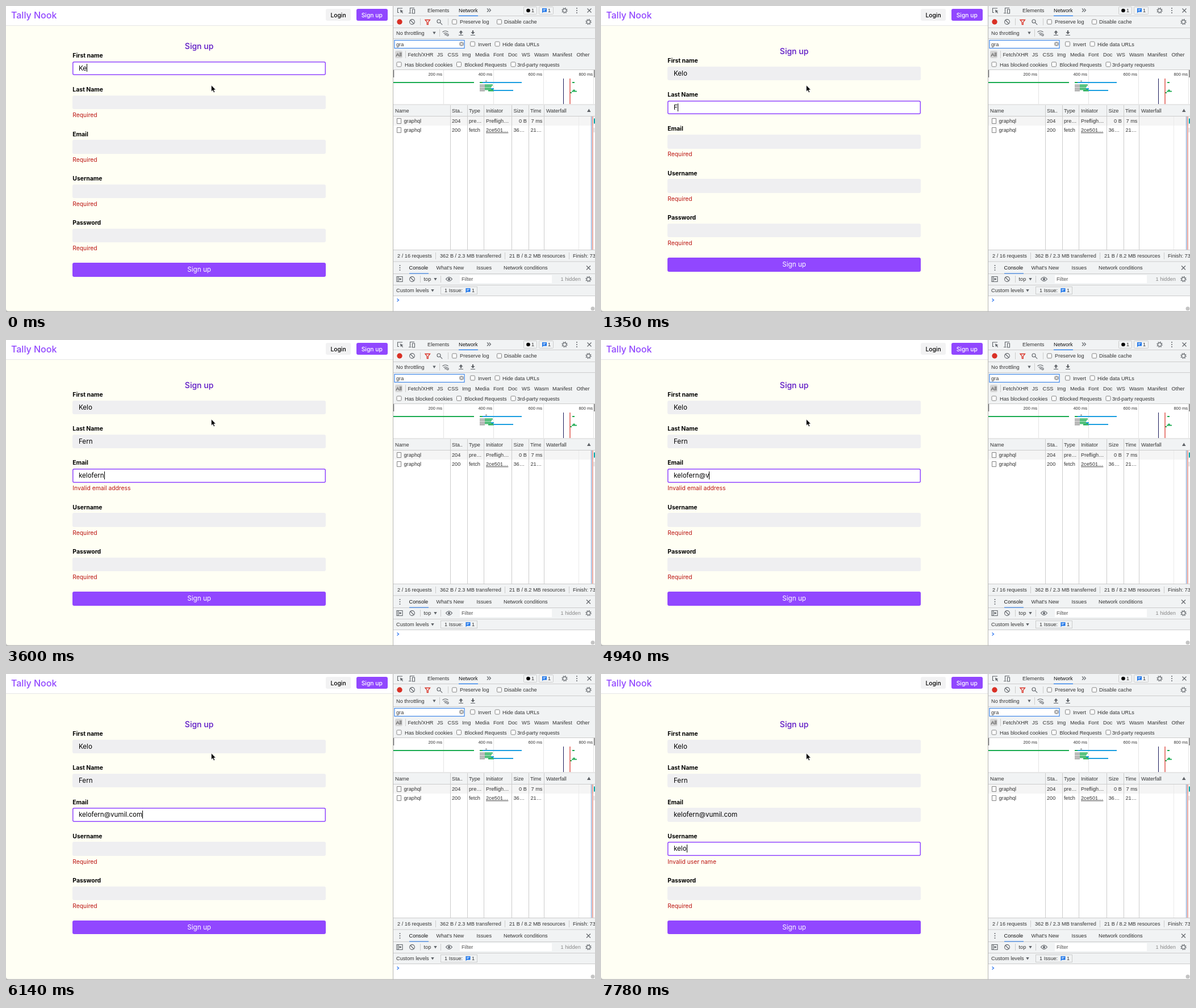
These frames come from a looping animation (1037 px wide and 540 px high, 8 s). An HTML page:

```html
<!DOCTYPE html>
<html lang="en">
<head>
<meta charset="utf-8">
<title>Sign up form</title>
<style>
html, body { margin: 0; width: 100%; height: 100%; overflow: hidden; background: #fff; }
#stage { position: relative; width: 1037px; height: 540px; overflow: hidden; font-family: Inter, sans-serif; color: #000; }
#page { position: absolute; left: 0; top: 0; width: 681px; height: 540px; background: #fffff4; }
#bar { position: absolute; left: 0; top: 0; width: 681px; height: 34px; background: #fff; border-bottom: 1px solid #e6e6e6; }
#bar div { position: absolute; white-space: nowrap; }
#bar .brand { left: 9px; top: 6px; line-height: 20px; font-size: 16px; font-weight: 500; color: #9147ff; }
#bar .btn { top: 5px; height: 21px; line-height: 22px; border-radius: 3px; font-size: 10.3px; font-weight: 500; text-align: center; }
#form { position: absolute; left: 117.3px; width: 445.6px; white-space: nowrap; }
#form h1 { position: relative; top: .6px; margin: 0; font-size: 14px; line-height: 16px; font-weight: 500; text-align: center; color: #5c16c5; }
.field { position: relative; height: 60.2px; }
.field.bad { height: 78.4px; }
.field b { font-size: 10.4px; line-height: 18px; position: absolute; top: 1px; }
.input { position: absolute; top: 19.6px; left: 0; box-sizing: border-box; width: 100%; height: 24.5px; padding-left: 10.7px; line-height: 24.5px; border-radius: 3px; font-size: 11.6px; background: #efeff1; }
.input.half { background: #f7f7f8; box-shadow: inset 0 0 0 1.5px #c09bfc; }
.input.on { background: #fff; box-shadow: inset 0 0 0 1.5px #9147ff; }
.input i { display: none; width: 1px; height: 14px; background: #000; vertical-align: middle; margin-top: -2px; }
.input.caret i { display: inline-block; }
.field p { position: absolute; top: 45px; margin: 0; line-height: 18px; font-size: 10.3px; color: #bb1411; }
#send { margin-top: 1.4px; height: 24.5px; line-height: 24.5px; border-radius: 3px; background: #9147ff; color: #fff; font-size: 11.7px; text-align: center; }
svg { position: absolute; left: 0; top: 0; }
svg text { font: 9.2px "Liberation Sans", Arial, sans-serif; fill: #333; }
.line { stroke: #ccc; fill: none; }
.icon { stroke: #5f6368; fill: none; stroke-width: 1.1; }
.solid { fill: #5f6368; }
.box { fill: #fff; stroke: #767676; stroke-width: .9; }
</style>
</head>
<body>
<div id="stage">
  <div id="page">
    <div id="bar">
      <div class="brand">Tally Nook</div>
      <div class="btn" style="left:563px;width:44px;background:#f2f2f3">Login</div>
      <div class="btn" style="left:617px;width:54.6px;background:#9147ff;color:#fff">Sign up</div>
    </div>
    <div id="form"><h1>Sign up</h1><div id="fields"></div><div id="send">Sign up</div></div>
  </div>
  <svg width="1037" height="540" viewBox="0 0 1037 540">
    <defs>
      <g id="check"><rect class="box" x=".5" y=".5" width="8" height="8" rx="1.5"/></g>
      <g id="ban" class="icon"><circle r="4.4"/><path d="M-3-3 3 3"/></g>
      <g id="gear"><circle class="icon" r="3.1" stroke-width="2"/><circle class="icon" r="4.7" stroke-width="1.6" stroke-dasharray="1.8 1.89"/></g>
      <path id="down" class="solid" d="M-2.7-2h5.4L0 2.5z"/>
      <path id="close" class="icon" d="M-3.5-3.5l7 7m0-7l-7 7"/>
      <g id="dots" class="solid"><circle cy="-4" r="1"/><circle r="1"/><circle cy="4" r="1"/></g>
      <g id="note"><path d="M-4-4h8v6.5h-6L-4 4.5z" fill="#1a73e8"/><path d="M-2.4-2h4.8M-2.4 0h3.2" stroke="#fff"/></g>
      <path id="file" class="box" d="M.5.5h7v9h-7z"/>
    </defs>

    <!-- panel surfaces -->
    <path d="M681 0h356v540H681z" fill="#fff"/>
    <path d="M681 0h356v112H681zM681 175h356v19H681zM681 431h356v80H681z" fill="#f1f3f4"/>
    <path d="M682 195h355v16H682z" fill="#f5f5f5"/>
    <path class="line" d="M682 17.5h355M682 38.5h355M682 57.5h355M682 112.5h355M682 174h355M682 194.5h355M682 430.5h355M682 451h355M682 472.5h355M682 492.5h355M682 511.5h355"/>
    <path class="line" d="M782.5 175v255M812.5 175v255M841.5 175v255M890.5 175v255M920.5 175v255M947.5 175v255"/>
    <path class="line" d="M729.5 22v12M778.5 22v12M763.5 41v13M703.5 79v13M729.5 476v12M765.5 476v12M756.5 435v12M878.5 435v12M991.5 435v12"/>
    <path d="M681.5 0v540" stroke="#b5b5b5"/>

    <!-- tabs -->
    <g class="icon"><path d="M698 4h-8.500v7.500h2.500"/><path class="solid" d="M694 6.500l5.500 2.500-2.400.8 2 2.400-1 .8-2-2.400-1.200 2z" stroke="none"/><path d="M711.500 11.500V3.500h7.500M709 12.500h4.500M715.500 6h4v7h-4z"/></g>
    <text y="11.200"><tspan x="742">Elements</tspan><tspan x="797" fill="#111">Network</tspan></text>
    <path d="M797 17.300h34M710 472h34" stroke="#1a73e8" stroke-width="1.200"/>
    <path class="icon" d="M847 4.500l3 3-3 3m3.500-6l3 3-3 3"/>
    <g class="line"><rect x="911.500" y="1.500" width="23" height="13" rx="1"/><rect x="938.500" y="1.500" width="25" height="13" rx="1"/></g>
    <circle cx="919.500" cy="8" r="3.300"/><use href="#note" x="948" y="8"/>
    <text y="11.200"><tspan x="925">1</tspan><tspan x="954">1</tspan></text>
    <use href="#gear" x="983.500" y="8"/><use href="#dots" x="1005" y="8"/><use href="#close" x="1027" y="8"/>

    <!-- network toolbar -->
    <circle cx="693" cy="28" r="4.700" fill="#d93025"/><use href="#ban" x="715" y="28"/>
    <path d="M738 24.500h8.500l-3.200 4.200v4h-2v-4z" fill="none" stroke="#d93025" stroke-width="1.300"/>
    <g class="icon"><circle cx="762" cy="27" r="3"/><path d="M764.200 29.200l4 4"/></g>
    <use href="#check" x="785" y="23.500"/><use href="#check" x="864" y="23.500"/>
    <text y="31.200"><tspan x="799">Preserve log</tspan><tspan x="877">Disable cache</tspan></text>
    <use href="#gear" x="1025.500" y="28"/>
    <text x="687" y="50.800">No throttling</text><use href="#down" x="754" y="47.500"/>
    <g class="icon"><path d="M768.500 46q5-4 10 0M770.500 48.500q3-2 6 0"/><circle cx="773.500" cy="50.500" r=".6"/><circle cx="777.500" cy="51" r="1.700"/><path d="M797 51.500h8M818 51.500h8"/></g>
    <path class="solid" d="M800 50v-3h-2.500l3.500-4 3.500 4H802v3zM821 43v3h-2.500l3.500 4 3.500-4H823v-3z"/>
    <rect x="684" y="60.500" width="123" height="14" fill="#fff" stroke="#3f87e8" stroke-width="1.200"/>
    <text x="687" y="70.800">gra</text>
    <circle cx="802" cy="67" r="4" fill="#aaa"/><path d="M800.300 65.300l3.400 3.400m0-3.400l-3.400 3.400" stroke="#fff"/>
    <use href="#check" x="817" y="62.500"/><use href="#check" x="860.500" y="62.500"/>
    <text y="70.800"><tspan x="831">Invert</tspan><tspan x="874">Hide data URLs</tspan></text>
    <rect x="685" y="79" width="13" height="13" rx="3" fill="#d6d6d6"/>
    <text y="88.800"><tspan x="686.500">All</tspan><tspan x="707.500">Fetch/XHR</tspan><tspan x="759">JS</tspan><tspan x="777.500">CSS</tspan><tspan x="803">Img</tspan><tspan x="826">Media</tspan><tspan x="858">Font</tspan><tspan x="884">Doc</tspan><tspan x="908">WS</tspan><tspan x="930">Wasm</tspan><tspan x="962">Manifest</tspan><tspan x="1004.500">Other</tspan></text>
    <use href="#check" x="687.500" y="98.500"/><use href="#check" x="793" y="98.500"/><use href="#check" x="888.500" y="98.500"/>
    <text y="106.800"><tspan x="702">Has blocked cookies</tspan><tspan x="807.500">Blocked Requests</tspan><tspan x="900">3rd-party requests</tspan></text>

    <!-- timeline overview -->
    <path d="M770.500 113v60M858.500 113v60M946.500 113v60M1034.500 113v60" stroke="#e4e4e4"/>
    <text y="123" text-anchor="end" style="font-size:7.500px"><tspan x="768">200 ms</tspan><tspan x="856">400 ms</tspan><tspan x="944">600 ms</tspan><tspan x="1033">800 ms</tspan></text>
    <path d="M682.500 113v13M1036 113v13" stroke="#777" stroke-width="1.500"/>
    <g fill="none" stroke-width="1.800">
      <path d="M682 135h142M834 135h5M843 139.500h14M843 142.200h12M843 144.800h11M843 147.400h15M849 149.500h10M997 135h4M996 150.700h9M998 148.700h4M993 153h3" stroke="#1aab50"/>
      <path d="M839 135h69M858 149h35M854 146h5" stroke="#1a9ee0"/>
      <path d="M834 139.500h9M834 142.200h9M834 144.800h9M834 147.400h9M834 149.600h9M844 132.500h3" stroke="#a0a0a0"/>
    </g>
    <path d="M981.500 128v45" stroke="#1d1d5c"/><path d="M993 128v45" stroke="#d93025" stroke-width="1.200"/>

    <!-- request table -->
    <text y="188.200"><tspan x="685">Name</tspan><tspan x="785">Sta..</tspan><tspan x="815">Type</tspan><tspan x="845">Initiator</tspan><tspan x="893.500">Size</tspan><tspan x="923">Time</tspan><tspan x="951">Waterfall</tspan></text>
    <path d="M942 176h5v17h-5z" fill="#f1f3f4"/><path class="solid" d="M1023 187h6.500l-3.200-5.500z"/>
    <use href="#file" x="688" y="198"/><use href="#file" x="688" y="214"/>
    <text y="206.300"><tspan x="700.500">graphql</tspan><tspan x="785">204</tspan><tspan x="815">pre…</tspan><tspan x="845">Prefligh…</tspan><tspan x="903">0 B</tspan><tspan x="924.500">7 ms</tspan></text>
    <text y="222.300"><tspan x="700.500">graphql</tspan><tspan x="785">200</tspan><tspan x="815">fetch</tspan><tspan x="845" text-decoration="underline">2ce501…</tspan><tspan x="893.500">36…</tspan><tspan x="923.500">21…</tspan></text>
    <path d="M1008.500 195v235" stroke="#eaeaea"/>
    <path d="M1030.500 195v235" stroke="#6f97cc"/><path d="M1032.900 195v235" stroke="#d2685f" stroke-width="1.200"/>
    <path d="M1035 198.500h2v9h-2z" fill="#00a5a5"/><path d="M1034.500 215h2v8h-2z" fill="#ddd"/>
    <text y="444.200"><tspan x="689">2 / 16 requests</tspan><tspan x="764">362 B / 2.3 MB transferred</tspan><tspan x="886">21 B / 8.2 MB resources</tspan><tspan x="998">Finish: 735 ms</tspan></text>

    <!-- console drawer -->
    <use href="#dots" x="693.500" y="462"/><use href="#close" x="1025.500" y="462"/>
    <text y="465.200"><tspan x="709.500" fill="#111">Console</tspan><tspan x="757.500">What's New</tspan><tspan x="828.500">Issues</tspan><tspan x="876">Network conditions</tspan></text>
    <path class="icon" d="M688 477.500h10v9h-10zM690.500 477.500v9"/><path class="solid" d="M692.500 479.500l4 2.500-4 2.500z"/>
    <use href="#ban" x="715" y="482"/>
    <text x="735.500" y="485.300">top</text><use href="#down" x="756" y="482"/>
    <path class="icon" d="M774.500 482q5.500-7 11 0q-5.500 7-11 0z"/><circle class="solid" cx="780" cy="482" r="2"/>
    <rect x="799" y="475" width="162" height="14" fill="#fff"/>
    <text y="485.300"><tspan x="802" fill="#555">Filter</tspan><tspan x="976.500" fill="#888">1 hidden</tspan></text>
    <use href="#gear" x="1025.500" y="482"/>
    <text x="687" y="505.200">Custom levels</text><use href="#down" x="751" y="502"/>
    <rect class="line" x="765.500" y="495.500" width="64" height="13"/>
    <text y="505.200"><tspan x="772">1 Issue:</tspan><tspan x="820">1</tspan></text><use href="#note" x="813.500" y="502"/>
    <path d="M688.500 516.500l3 2.500-3 2.500" fill="none" stroke="#367cf1" stroke-width="1.300"/>
    <circle cx="1033" cy="534" r="3.500" fill="#c4c4c4"/>

    <!-- window edge and pointer -->
    <path d="M0 534q0 4.500 5 4.500h1032v1.500H0z" fill="#bdbdbd"/>
    <path d="M361.400 139.800v11.300l2.600-2.400 1.800 4 1.900-.9-1.800-3.800h3.500z" stroke="#fff" stroke-width=".7"/>
  </svg>
</div>
<script>
const LOOP = 8000;
const labels = ["First name", "Last Name", "Email", "Username", "Password"];
const answers = ["Kelo", "Fern", "kelofern@vumil.com", "kelo", ""];
// [start ms, focused field, characters typed]
const steps = [
  [0, 0, 2], [150, 0, 3], [300, 0, 4],
  [750, 1, 0], [1350, 1, 1], [1500, 1, 2], [1800, 1, 3], [1950, 1, 4],
  [2250, 2, 0], [2550, 2, 1], [2700, 2, 2], [3000, 2, 4], [3300, 2, 5], [3450, 2, 7], [3600, 2, 8],
  [4640, 2, 9], [4940, 2, 10], [5090, 2, 11], [5240, 2, 12], [5390, 2, 14],
  [5690, 2, 15], [5840, 2, 16], [5990, 2, 17], [6140, 2, 18],
  [6590, 3, 0], [7030, 3, 1], [7330, 3, 2], [7630, 3, 3], [7780, 3, 4]
];

const form = document.getElementById("form");
const fields = labels.map(label => {
  const box = document.createElement("div");
  box.innerHTML = `<b>${label}</b><div class="input"><span></span><i></i></div><p></p>`;
  document.getElementById("fields").append(box);
  const [input, text, error] = ["div", "span", "p"].map(tag => box.querySelector(tag));
  return { box, input, text, error };
});

function problem(i, value) {
  if (!value) return "Required";
  if (i === 2 && !/^\w+@\w+\.\w{2,}$/.test(value)) return "Invalid email address";
  if (i === 3 && value.length < 5) return "Invalid user name";
  return "";
}

function render(t) {
  const [, active, typed] = steps.findLast(s => s[0] <= t);
  const fading = t >= 750 && t < 900;
  const blink = t >= 4200 && t < 4640;
  let errors = 0;
  fields.forEach((f, i) => {
    const value = i < active ? answers[i] : i === active ? answers[i].slice(0, typed) : "";
    const error = problem(i, value);
    if (error) errors++;
    f.text.textContent = value;
    f.error.textContent = error;
    f.box.className = error ? "field bad" : "field";
    const look = fading && i < 2 ? " half" : i === active ? " on" : "";
    f.input.className = "input" + look + (i === active && !blink ? " caret" : "");
  });
  form.style.top = 62 + 9.1 * (4 - errors) + "px";
}

const start = performance.now();
function tick() {
  render((performance.now() - start) % LOOP);
  requestAnimationFrame(tick);
}
tick();
</script>
</body>
</html>
```
